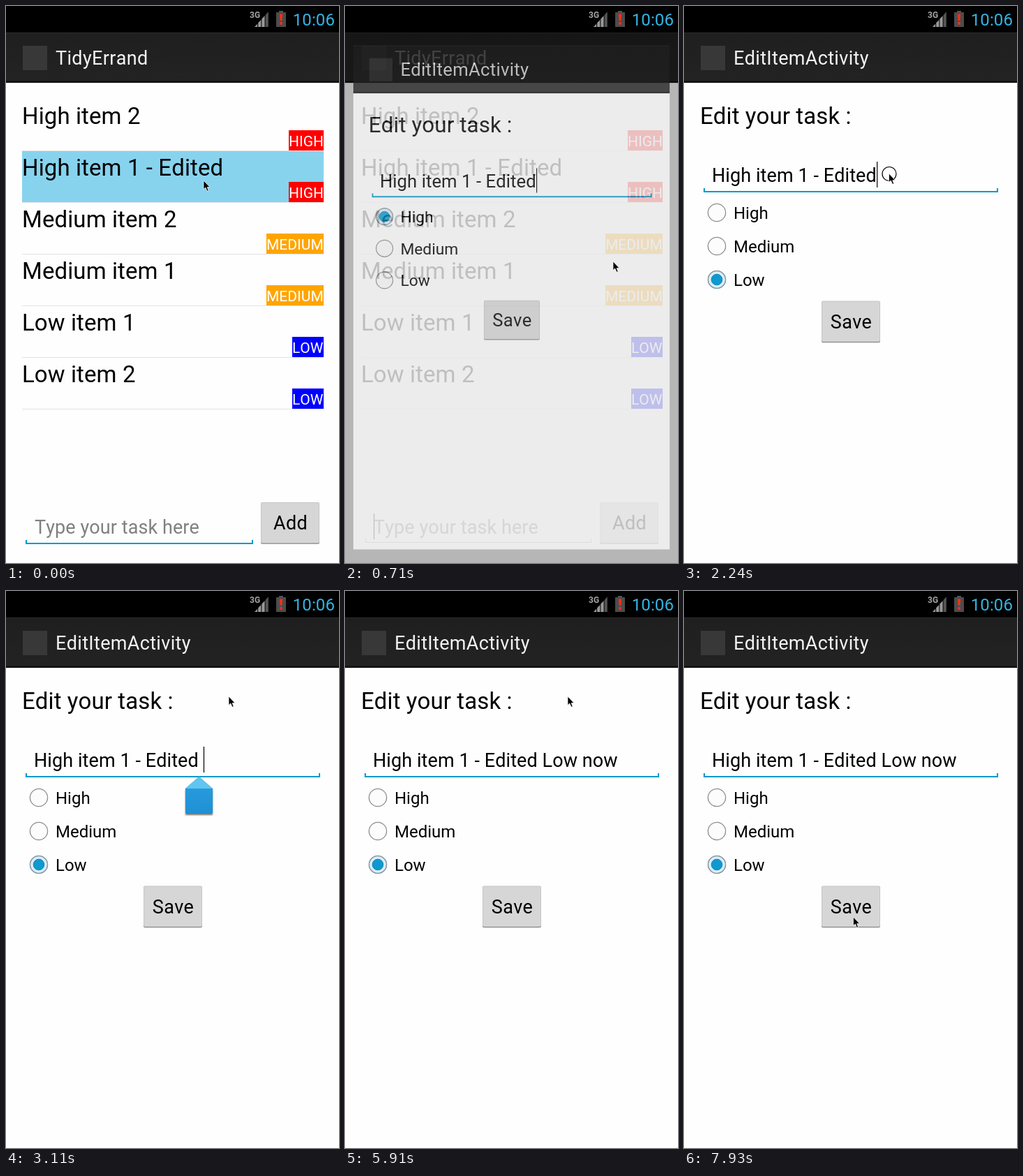
Recreate the animation shown at these times as an HTML page. Size 477 by 798 pixels, loop 8 s.

```html
<!DOCTYPE html>
<html lang="en">
<head>
<meta charset="utf-8">
<title>Task list</title>
<style>
html, body { margin: 0; width: 100%; height: 100%; overflow: hidden; background: #000; }
svg { display: block; width: 100%; height: 100%; }
text { font-family: Roboto, "Open Sans", sans-serif; font-kerning: none; white-space: pre; }
.big { font-size: 33px; letter-spacing: .1px; }
.title { font-size: 27px; letter-spacing: .33px; fill: #f3f3f3; }
.field { font-size: 27px; letter-spacing: .08px; }
.hint { fill: #808080; }
.label { font-size: 24px; }
.button { font-size: 27px; letter-spacing: .3px; text-anchor: middle; }
.badge { font-size: 21px; fill: #fff; }
.line { fill: none; stroke: #0099cc; stroke-width: 2; }
</style>
</head>
<body>
<svg viewBox="0 0 477 798" preserveAspectRatio="none">
  <defs>
    <linearGradient id="bar" x2="0" y2="1">
      <stop offset="0" stop-color="#1f1f1f"/><stop offset="1" stop-color="#232323"/>
    </linearGradient>
    <linearGradient id="drop" x2="0" y2="1">
      <stop offset="0" stop-color="#2a9fe0"/><stop offset="1" stop-color="#1f90d4"/>
    </linearGradient>
    <filter id="soft" x="-30%" y="-30%" width="160%" height="160%">
      <feGaussianBlur stdDeviation="1.3"/>
    </filter>
  </defs>
  <g id="list"></g>
  <rect id="dim" y="38" width="477" height="760"/>
  <g id="edit"></g>
  <g id="status"></g>
  <circle id="tap" r="10" fill="none" stroke="#000" stroke-width="1.2"/>
  <path id="arrow" d="M0 0V12.5L2.8 10L5 15H7.2L5.2 9.6H9Z" stroke="#fff" stroke-width=".7"/>
</svg>
<script>
const LOOP = 8000;
const $ = id => document.getElementById(id);
const rect = (x, y, w, h, fill, more = '') =>
  `<rect x="${x}" y="${y}" width="${w}" height="${h}" fill="${fill}" ${more}/>`;
const text = (x, y, cls, str, more = '') =>
  `<text x="${x}" y="${y}" class="${cls}" ${more}>${str}</text>`;

const page = title =>
  rect(0, 110, 477, 688, '#fefefe') +
  rect(0, 38, 477, 72, 'url(#bar)') +
  rect(0, 38, 477, 1, '#2e2e2e') +
  rect(0, 107.5, 477, 2.5, '#111') +
  rect(0, 110, 477, 1, '#e4e4e4') +
  rect(24, 57, 35, 35, '#383838') +
  text(71, 84, 'title', title);

const button = (x, y, label) =>
  rect(x, y + 1, 84, 58.7, '#8c8c8c', 'rx="2"') +
  rect(x, y, 84, 58.4, '#c6c6c6', 'rx="2"') +
  rect(x + 1, y + 1, 82, 57, '#d6d6d6', 'rx="1"') +
  text(x + 42.5, y + 39, 'button', label);

const underline = (x1, x2, y, id) =>
  `<path id="${id}" class="line" d="M${x1} ${y - 5}V${y}H${x2}V${y - 5}"/>`;

const BADGES = { High: ['#f00', 50], Medium: ['#ffa500', 82], Low: ['#00f', 45] };

function row(name, i) {
  const y = 134 + 74 * i, level = name.split(' ')[0], [color, w] = BADGES[level];
  return rect(23, y + 73, 432, 1, '#e3e3e3') +
    text(23, y + 35, 'big', name) +
    rect(455 - w, y + 44, w, 29, color) +
    text(455 - w, y + 67, 'badge', level.toUpperCase());
}

function radio(label, i) {
  const y = 296 + 48 * i;
  return `<circle cx="47" cy="${y}" r="12.6" fill="#fcfcfc" stroke="#8e8e8e" stroke-width="1.3"/>` +
    text(71, y + 9, 'label', label);
}

const names = ['High item 2', 'High item 1 - Edited', 'Medium item 2',
  'Medium item 1', 'Low item 1', 'Low item 2'];

$('list').innerHTML = page('TidyErrand') +
  rect(23, 208, 432, 73, '#87d3ee', 'id="glow"') +
  names.map(row).join('') +
  text(41, 756, 'field hint', 'Type your task here') +
  underline(29, 353, 770, 'focusLine') +
  underline(29.5, 352.5, 768.5, 'idleLine') +
  rect(41, 727, 1.2, 37, '#000', 'id="newCaret"') +
  button(365, 711, 'Add');
$('idleLine').style.cssText = 'stroke: #a8a8a8; stroke-width: 1';

$('edit').innerHTML = page('EditItemActivity') +
  text(23, 169, 'big', 'Edit your task :') +
  text(40, 252, 'field', '', 'id="task"') +
  underline(29, 449, 266, 'taskLine') +
  rect(0, 223, 1.2, 37, '#000', 'id="caret"') +
  ['High', 'Medium', 'Low'].map(radio).join('') +
  `<g id="dot"><circle cx="47" r="12.4" fill="#dcedf6" stroke="#8199a6" stroke-width="1.2"/>
    <circle cx="47" r="7.8" fill="#0d9ad0" stroke="#1585b3"/></g>` +
  button(197, 422.5, 'Save') +
  `<g id="handle">
    <path d="M276.5 268L296 285V321H257V285Z" opacity=".55" filter="url(#soft)"/>
    <path d="M276.5 266L296 283V317Q296 319 294 319H259Q257 319 257 317V283Z" fill="url(#drop)"/>
    <path d="M276.5 266L296 283H257Z" fill="#60c6f0"/></g>`;

const signal = [0, 1, 2, 3].map(i => {
  const x = 356 + 5.2 * i, top = 30 - 5.7 * i;
  return `<path d="M${x} 30V${top}L${x + 4.2} ${top - 4.6}V30Z" fill="${i < 3 ? '#999' : '#555'}"/>`;
}).join('');

$('status').innerHTML = rect(0, 0, 477, 38, '#000') + signal +
  text(349, 17, '', '3G', 'font-size="12" font-weight="700" fill="#a4a4a4" stroke="#000" stroke-width="2" paint-order="stroke"') +
  rect(391, 7, 6, 3, '#555') + rect(387, 9, 14, 21, '#4c4c4c') +
  `<path d="M391.8 11.5H396.2L395.3 21H392.7Z" fill="#f5301a"/>` +
  rect(392.3, 23, 3.4, 3.6, '#f5301a') +
  text(471, 28, '', '10:06', 'font-size="24" fill="#33b5e5" text-anchor="end" letter-spacing=".1"');

// Pointer stops: time, x, y
const PATH = [
  [0, 283, 250], [390, 283, 250], [500, 281, 258], [710, 384, 366], [830, 345, 415],
  [1150, 100, 391], [1600, 100, 391], [2110, 293.5, 240], [2410, 293.5, 240],
  [2760, 308, 191], [2940, 308, 191], [3100, 319, 151], [6390, 319, 151],
  [6960, 294, 330], [7150, 294, 330], [7360, 178, 334], [7540, 178, 334],
  [7930, 242.5, 467], [LOOP, 242.5, 467]
];
const BLINKS = [1620, 2110, 2760, 3110, 3600, 4100, 5910, 6390, 6890, 7360, 7860];
const KEYS = [3110, 4280, 4780, 4840, 5020, 5250, 5310, 5370];
const TYPED = ' Low now';

const passed = (times, t) => times.filter(k => k <= t).length;
const within = (t, a, b) => t >= a && t < b;
const progress = (t, from, to) => Math.min(1, Math.max(0, (t - from) / (to - from)));
const show = (id, on) => { $(id).style.display = on ? '' : 'none'; };

function pointer(t) {
  const i = Math.max(1, PATH.findIndex(p => p[0] > t));
  const [t0, x0, y0] = PATH[i - 1], [t1, x1, y1] = PATH[i];
  const u = progress(t, t0, t1), e = u * u * (3 - 2 * u);
  return [x0 + (x1 - x0) * e, y0 + (y1 - y0) * e];
}

// The edit page fades and grows in while the list darkens
function openPage(t) {
  const fade = progress(t, 390, 1150);
  const scale = 1 - .2 * (1 - progress(t, 360, 1310)) ** 3;
  show('edit', fade > 0);
  show('list', fade < 1);
  $('dim').setAttribute('opacity', Math.min(1, 1.4 * fade ** 1.84));
  $('edit').setAttribute('opacity', 1 - (1 - fade) ** 2.55);
  $('edit').setAttribute('transform',
    `translate(${238.5 * (1 - scale)} ${410 * (1 - scale)}) scale(${scale})`);
}

function draw(t) {
  const focused = t < 100;
  show('glow', t < 60);
  show('focusLine', focused);
  show('idleLine', !focused);
  show('newCaret', !focused);
  openPage(t);

  const task = $('task');
  task.textContent = names[1] + TYPED.slice(0, passed(KEYS, t));
  $('caret').setAttribute('x', 40.3 + task.getComputedTextLength());
  show('caret', passed(BLINKS, t) % 2 === 0);
  $('dot').setAttribute('transform', `translate(0 ${t < 1530 ? 296 : 392})`);
  show('handle', within(t, 2410, 3230));

  const [x, y] = pointer(t);
  $('arrow').setAttribute('transform', `translate(${x} ${y})`);
  $('tap').setAttribute('cx', x + .5);
  $('tap').setAttribute('cy', y + .5);
  show('tap', within(t, 1400, 1560) || within(t, 2240, 2410));
}

const start = performance.now();
function tick() {
  draw((performance.now() - start) % LOOP);
  requestAnimationFrame(tick);
}
tick();
</script>
</body>
</html>
```
